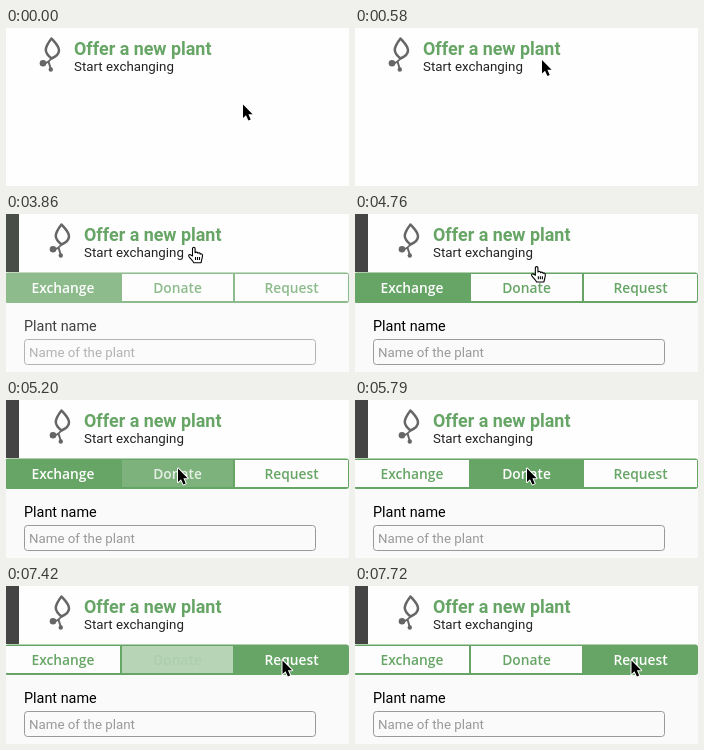
These frames come from a looping animation (343x158 px, 8000 ms). An HTML page:

```html
<!DOCTYPE html>
<html lang="en">
<head>
<meta charset="utf-8">
<title>Offer a new plant</title>
<style>
  html, body { margin: 0; width: 100%; height: 100%; overflow: hidden; background: #fefefe; }
  svg { display: block; width: 343px; height: 158px; }
  text { font-family: Roboto, sans-serif; fill: #222; }
  .title { font-size: 17.9px; font-weight: 600; fill: #66a565; }
  .small { font-size: 13.3px; }
  .tab { font: 600 13.8px "Open Sans", "Noto Sans", sans-serif; text-anchor: middle; }
</style>
</head>
<body>
<svg viewBox="0 0 343 158">
  <rect width="343" height="158" fill="#fefefe"/>
  <g id="panel">
    <rect y="58" width="343" height="100" fill="#fafafa"/>
    <rect x="-1" y="58.5" width="344" height="30.5" rx="3" fill="#66a565"/>
    <g id="tabs"></g>
    <text x="18" y="117" font-size="14.4" style="fill:#000">Plant name</text>
    <rect x="18.5" y="125.5" width="291" height="25" rx="3" fill="#fafafa" stroke="#999"/>
    <text x="23" y="143" class="small" style="fill:#999">Name of the plant</text>
  </g>
  <rect id="bar" height="58"/>
  <g id="head">
    <g fill="none" stroke="#666" stroke-width="2.5" stroke-linecap="round" stroke-linejoin="round">
      <path d="M45.5 10.5C42 15 39.8 18 39.8 22C39.8 25.5 42.5 28 45.5 30.5C50 28.5 53 26.5 53 22.5C53 18 49 14.5 45.5 10.5Z"/>
      <path d="M45.5 30C44.5 32.5 41 35 38 35.3M42.5 33.5L44.8 41" stroke-width="2"/>
    </g>
    <circle cx="37" cy="35.3" r="3.3" fill="#666"/>
    <circle cx="44.8" cy="41.5" r="2.2" fill="#666"/>
    <text x="68" y="26.5" class="title">Offer a new plant</text>
    <text x="68" y="43" class="small">Start exchanging</text>
  </g>
  <g id="cursor" stroke-linejoin="round">
    <path id="arrow" d="M1 1.5V15L4 12.2L6.4 17.4L8.7 16.4L6.4 11.3H10.6Z" fill="#000" stroke="#fff" stroke-width="2" paint-order="stroke"/>
    <path id="hand" d="M4.5 9.5V2.2C4.5 .3 7.1 .3 7.1 2.2V6.3C7.7 5.2 9.7 5.4 9.8 6.8C10.5 6 12.2 6.2 12.3 7.6C13.1 7 14.5 7.3 14.5 8.8C14.5 12 13.5 13 13.1 16.2H5.7C5.1 14.2 2.5 12.3 .9 10C0 8.5 1.7 7.5 2.9 8.5ZM7.5 10.5V13.5M9.5 10.5V13.5M11.5 10.5V13.5"
      fill="#fff" stroke="#000" stroke-width="1.1"/>
  </g>
</svg>
<script>
const LOOP = 8000, HOVER = 400, RELEASE = 300;
const GREEN = [102, 165, 101], PALE = [253, 253, 253], DARK = [68, 68, 68];
const $ = id => document.getElementById(id);

// start, length and number of steps of each burst of movement
const bursts = [[140, 440, 3], [3430, 730, 5], [4760, 1030, 7], [6690, 1030, 7]];

// where the pointer goes, and when
const start = { x: 236, y: 75 };
const moves = [
  { from: 0, to: 580, x: 186, y: 30.5 },
  { from: 3420, to: 3430, x: 182, y: 32.5 },
  { from: 4613, to: 5050, x: 171, y: 67 },
  { from: 6543, to: 6980, x: 275.5, y: 73 }
];

// a tab lights up on hover and goes out when the next one is clicked
const tabs = [
  { name: "Exchange", x: 0, w: 114, hover: -HOVER, out: 5360 },
  { name: "Donate", x: 116, w: 111, hover: 4860, out: 7260 },
  { name: "Request", x: 229, w: 113, hover: 6740, out: LOOP }
];

const ramp = (t, from, to) => Math.min(1, Math.max(0, (t - from) / (to - from)));
const ease = p => p * (2 - p);
const blend = (a, b, p) => a.map((v, i) => v + (b[i] - v) * p);
const rgb = c => `rgb(${c.map(Math.round)})`;

// The picture moves in steps and rests between bursts.
function tick(t) {
  const burst = bursts.filter(b => b[0] <= t).pop();
  if (!burst) return 0;
  const [from, span, steps] = burst;
  const nth = k => Math.floor((from + span * k / steps + .001) / 10) * 10;
  let k = steps;
  while (nth(k) > t) k--;
  return nth(k);
}

function add(tag, attrs) {
  const el = document.createElementNS("http://www.w3.org/2000/svg", tag);
  for (const k in attrs) el.setAttribute(k, attrs[k]);
  return $("tabs").appendChild(el);
}

for (const tab of tabs) {
  tab.box = add("rect", { x: tab.x, y: 60, width: tab.w, height: 27 });
  tab.label = add("text", { x: tab.x + tab.w / 2, y: 79, class: "tab" });
  tab.label.textContent = tab.name;
}

function drawPointer(t) {
  let { x, y } = start;
  for (const m of moves) {
    const p = ease(ramp(t, m.from, m.to));
    x += (m.x - x) * p;
    y += (m.y - y) * p;
  }
  const isHand = t >= 3430 && t < 4910;
  $("cursor").setAttribute("transform", `translate(${x} ${y})`);
  $("hand").style.display = isHand ? "" : "none";
  $("arrow").style.display = isHand ? "none" : "";
}

function drawHead(t) {
  const dx = 10 * ease(ramp(t, 3395, 3720));
  const lit = blend(PALE, GREEN, ramp(t, 3380, 3530));
  $("head").setAttribute("transform", `translate(${dx} 0)`);
  $("bar").setAttribute("width", dx ? dx + 3 : 0);
  $("bar").setAttribute("fill", rgb(blend(lit, DARK, ease(ramp(t, 3570, 4000)))));
}

function drawPanel(t) {
  $("panel").setAttribute("opacity", ease(ramp(t, 3570, 4160)));
  for (const tab of tabs) {
    const p = ramp(t, tab.hover, tab.hover + HOVER) * (1 - ramp(t, tab.out, tab.out + RELEASE));
    tab.box.setAttribute("fill", rgb(blend(PALE, GREEN, p)));
    tab.label.style.fill = rgb(blend(GREEN, PALE, p));
  }
}

const begin = performance.now();
function loop() {
  const t = tick((performance.now() - begin) % LOOP);
  drawHead(t);
  drawPanel(t);
  drawPointer(t);
  requestAnimationFrame(loop);
}
loop();
</script>
</body>
</html>
```
